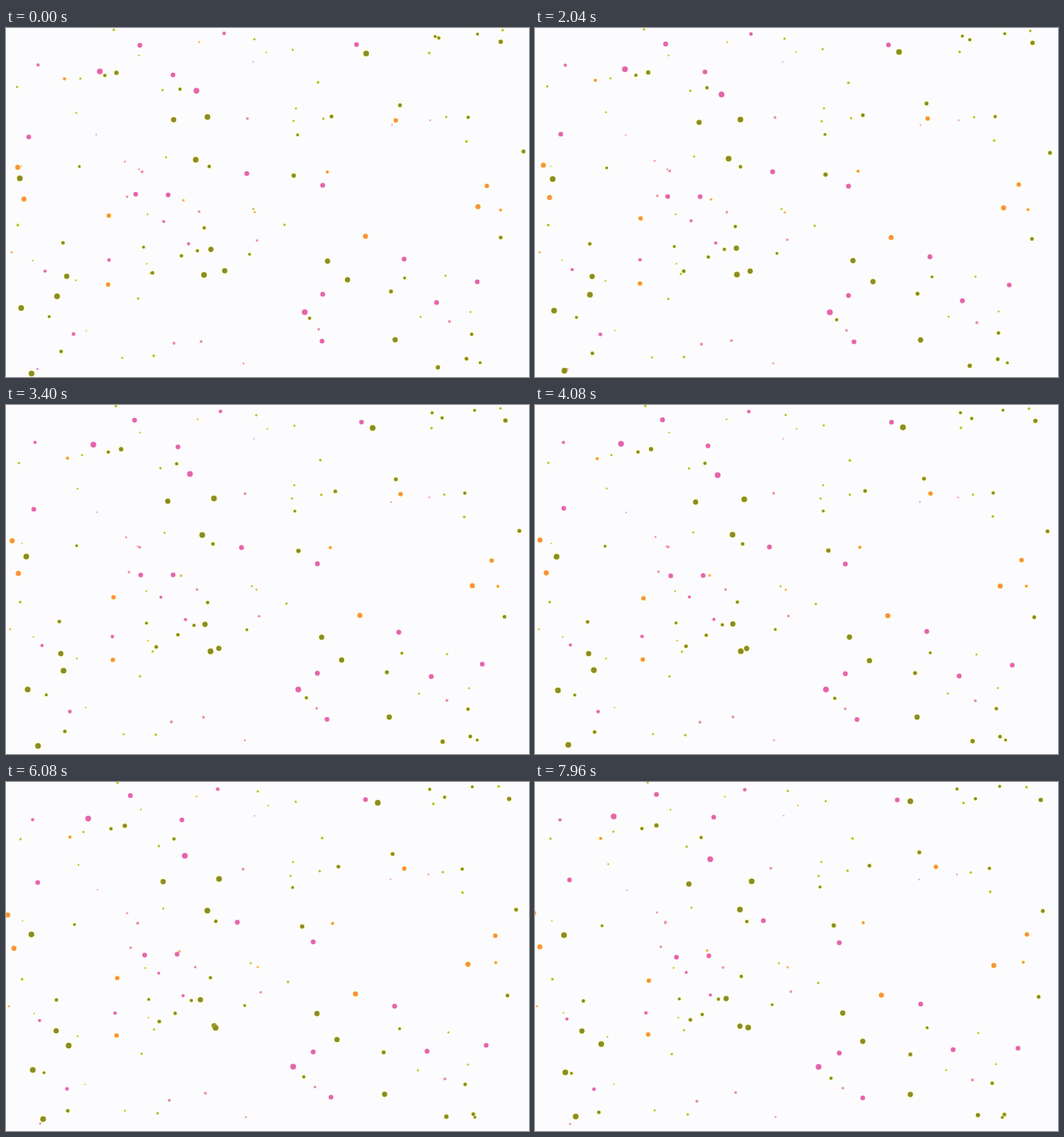
Recreate the animation shown at these times as an HTML page with a canvas. Size 758 by 506 pixels, loop 8000 ms.

```html
<!DOCTYPE html>
<html lang="en">
<head>
<meta charset="utf-8">
<title>Drifting dots</title>
<style>
  html, body { margin: 0; width: 100%; height: 100%; overflow: hidden; background: #fcfcfe; }
  canvas { display: block; }
</style>
</head>
<body>
<canvas width="758" height="506"></canvas>
<script>
const W = 758, H = 506, LOOP = 8000, STEP = 40, TRAVEL = 7960;
const ctx = document.querySelector('canvas').getContext('2d');

// Each tint has a near colour, a paler far colour and a rim.
const tints = {
  olive:  { near: '#8a8c24', far: '#b2b244', rim: '#f2f060' },
  pink:   { near: '#e664a8', far: '#e88c8c', rim: '#f8c4e4' },
  orange: { near: '#fa913c', far: '#eca868', rim: '#fcec70' }
};

// Large dots: tint, horizontal drift, then x, y and vertical drift of each dot.
const groups = [
  ['olive', 22, [522,37,-9, 292,129,15, 275,191,-6, 20,218,4, 287,358,-2, 74,389,-9, 37,501,-16, 22,406,15]],
  ['olive', -20, [243,133,15, 297,321,-7, 317,352,2, 564,452,1, 495,365,11, 88,360,1, 466,338,-3]],
  ['olive', 16, [160,65,-2, 717,20,6, 417,214,-6, 626,492,-9]],
  ['olive', -14, [558,382,13, 571,112,-10, 750,179,8]],
  ['pink', -22, [136,63,-13, 276,91,21, 433,412,1]],
  ['pink', -18, [194,25,-7, 577,335,-13, 459,386,7, 624,398,-10, 349,211,-10, 459,228,5]],
  ['pink', 17, [683,368,18, 508,24,2, 188,241,13, 235,242,10, 458,454,4, 33,158,-16, 242,68,-17]],
  ['orange', -19, [684,259,7, 26,248,-9, 17,202,-12, 521,302,7]],
  ['orange', 16, [565,134,-11, 149,272,16, 148,372,-6, 697,229,-8]]
];

function seededRandom(seed) {
  return () => {
    seed = (seed + 0x6D2B79F5) | 0;
    let n = Math.imul(seed ^ (seed >>> 15), 1 | seed);
    n = (n + Math.imul(n ^ (n >>> 7), 61 | n)) ^ n;
    return ((n ^ (n >>> 14)) >>> 0) / 4294967296;
  };
}

function smallDots(count) {
  const random = seededRandom(27);
  return Array.from({ length: count }, () => {
    const speed = 2 + 11 * random();
    const pick = random();
    return {
      tint: pick < 0.56 ? 'olive' : pick < 0.84 ? 'pink' : 'orange',
      x: W * random(),
      y: H * random(),
      dx: random() < 0.5 ? -speed : speed,
      dy: speed * (2 * random() - 1)
    };
  });
}

function largeDots() {
  return groups.flatMap(([tint, dx, values]) => {
    const dots = [];
    for (let i = 0; i < values.length; i += 3) {
      const [x, y, dy] = values.slice(i, i + 3);
      dots.push({ tint, x, y, dx, dy });
    }
    return dots;
  });
}

// Nearer dots are both larger and faster.
const dots = [...smallDots(90), ...largeDots()]
  .sort((a, b) => Math.abs(a.dx) - Math.abs(b.dx));

function disc(x, y, radius, color, alpha) {
  ctx.globalAlpha = alpha;
  ctx.fillStyle = color;
  ctx.beginPath();
  ctx.arc(x, y, radius, 0, 2 * Math.PI);
  ctx.fill();
}

function draw(time) {
  const progress = Math.floor(time % LOOP / STEP) * STEP / TRAVEL;
  ctx.globalAlpha = 1;
  ctx.fillStyle = '#fcfcfe';
  ctx.fillRect(0, 0, W, H);
  for (const dot of dots) {
    const speed = Math.abs(dot.dx);
    const x = dot.x + dot.dx * progress;
    const y = dot.y + dot.dy * progress;
    const radius = 0.4 + 0.165 * speed;
    const { near, far, rim } = tints[dot.tint];
    disc(x, y, radius + 0.9, rim, 0.6);
    disc(x, y, radius, speed < 9 ? far : near, 1);
  }
}

const start = performance.now();
function frame() {
  draw(performance.now() - start);
  requestAnimationFrame(frame);
}
frame();
</script>
</body>
</html>
```
